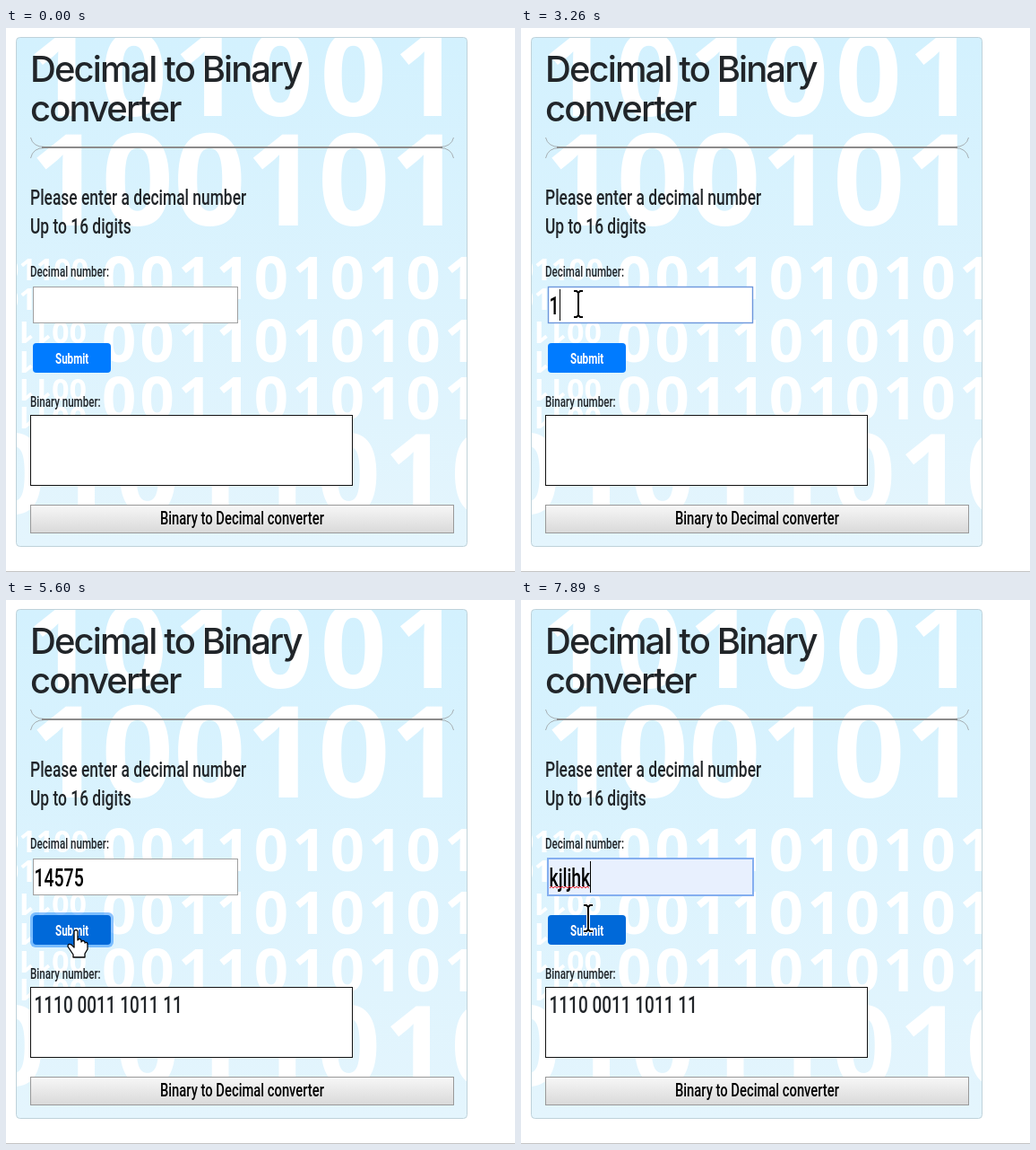
These frames come from a looping animation (568x606 px, 8 s). An HTML page:

```html
<!DOCTYPE html>
<html lang="en">
<head>
<meta charset="utf-8">
<title>Decimal to Binary converter</title>
<style>
  html, body { margin: 0; height: 100%; overflow: hidden; background: #fff; }
  svg { display: block; width: 100vw; height: 100vh; }
  text { white-space: pre; }
  .cond { font-family: Roboto, "Liberation Sans", sans-serif; font-weight: 500; fill: #212529; }
  .title { font: 500 40px Inter, Roboto, sans-serif; letter-spacing: -1.9px; fill: #212529; }
  .digits { font-family: "Open Sans", "Noto Sans", sans-serif; font-weight: 700; fill: #fff; }
  .ui { font: 12.4px "Open Sans", "Noto Sans", sans-serif; fill: #222; }
</style>
</head>
<body>
<svg viewBox="0 0 568 606">
  <defs>
    <linearGradient id="sky" x2="0" y2="1">
      <stop stop-color="#d3f1fe"/><stop offset="1" stop-color="#e4f5fd"/>
    </linearGradient>
    <linearGradient id="steel" x2="0" y2="1">
      <stop stop-color="#f7f7f7"/><stop offset="1" stop-color="#d9d9d9"/>
    </linearGradient>
    <clipPath id="card"><rect x="12" y="11" width="503" height="566" rx="3"/></clipPath>
    <filter id="soft" x="-5%" y="-5%" width="110%" height="112%">
      <feDropShadow dx="0" dy="1" stdDeviation="1.3" flood-opacity=".4"/>
    </filter>
  </defs>

  <rect x="11.5" y="10.5" width="503" height="567" rx="4" fill="url(#sky)"/>
  <g id="digits" class="digits" clip-path="url(#card)"></g>
  <rect x="11.5" y="10.5" width="503" height="567" rx="4" fill="none" stroke="#bfd2da"/>
  <path d="M0 605.5H568" stroke="#c4c4c4"/>

  <text class="title" x="27" y="60">Decimal to Binary</text>
  <text class="title" x="27" y="104">converter</text>
  <path d="M27.5 122Q30 132.5 43 132.5M484 132.5Q497 132.5 499.5 122M27.5 145Q30 133.5 43 133.5M484 133.5Q497 133.5 499.5 145"
        fill="none" stroke="#8c8b8b" opacity=".65"/>
  <path d="M40 133H487" stroke="#8c8b8b" stroke-width="2"/>

  <rect id="input"/>
  <rect id="ring" x="27" y="348" width="93" height="39" rx="6" fill="#007bff" opacity=".45"/>
  <rect id="submit" x="30" y="351" width="87" height="33" rx="4"/>
  <rect x="27.5" y="431.5" width="359" height="78" fill="#fff" stroke="#111"/>
  <rect x="27.5" y="531.5" width="472" height="31" fill="url(#steel)" stroke="#999"/>
  <g id="labels"></g>
  <path id="squiggle" fill="none" stroke="#e23" stroke-width="1"/>
  <rect id="caret" y="291" width="1" height="35"/>

  <g id="list" class="ui">
    <path d="M30 330H259V452Q259 455 256 455H33Q30 455 30 452Z" fill="#fff" filter="url(#soft)"/>
    <rect id="hover" x="30" y="340" width="229" height="36" fill="#e8e8e8"/>
    <text x="42" y="362">kjljhk</text>
    <text x="42" y="398">22</text>
    <text x="42" y="434">255</text>
  </g>
  <g id="tip">
    <rect x="110" y="333" width="134" height="20" fill="#000" opacity=".35"/>
    <rect x="107.5" y="330.5" width="133" height="19" fill="#fff" stroke="#767676"/>
    <text class="ui" x="113" y="344" style="font-size:11.4px;fill:#575757">Please fill out this field.</text>
  </g>

  <g id="cursor" stroke-linejoin="round">
    <g id="beam" fill="none">
      <path d="M-5-14H-2L0-12L2-14H5M0-12V13M-5 15H-2L0 13L2 15H5" stroke="#fff" stroke-width="4"/>
      <path d="M-5-14H-2L0-12L2-14H5M0-12V13M-5 15H-2L0 13L2 15H5" stroke="#000" stroke-width="2"/>
    </g>
    <path id="hand" fill="#fff" stroke="#000" stroke-width="1.3"
      d="M-2 1Q0-2 2 1V11Q4 8 6 11V13Q8 10 10 13V14Q13 12 13 16V21L10 26V30H-3V27L-9 18Q-9 14-5 16L-2 19Z"/>
    <path id="arrow" fill="#fff" stroke="#000" stroke-width="1.3" d="M0 0V25L6 20L10 29L14 27L10 18H18Z"/>
  </g>
</svg>

<script>
const $ = id => document.getElementById(id);
const NARROW = .725;   // the condensed face, shared by all body text
const LOOP = 8000;

function put(parent, str, transform, size, more = {}) {
  const el = document.createElementNS('http://www.w3.org/2000/svg', 'text');
  el.setAttribute('transform', transform);
  el.style.fontSize = size + 'px';
  Object.assign(el.style, more);
  el.textContent = str;
  $(parent).append(el);
  return el;
}

const label = (x, y, size, str, more) => {
  const el = put('labels', str, `translate(${x} ${y}) scale(${NARROW} 1)`, size, more);
  el.setAttribute('class', 'cond');
  return el;
};

const row = (x, y, size, str, gap = 0, turn = 0) =>
  put('digits', str, `translate(${x} ${y}) rotate(${turn})`, size, { letterSpacing: gap + 'px' });

row(-58, 98, 130, '0101001', 7.5);
row(26, 220, 141, '1001011');
for (const y of [302, 372, 436]) row(107, y, 67, '0011010101', 4.2);
for (const y of [281, 314]) row(-5, y, 34, '01100');
for (const y of [327, 360, 391, 422]) row(90, y, 34, '00110', 0, 180);
row(-27, 541, 124, '01011010', 4);

label(27, 197, 24, 'Please enter a decimal number');
label(27, 229, 24, 'Up to 16 digits');
label(27, 277, 16, 'Decimal number:');
label(27, 422, 16, 'Binary number:');
label(55, 374, 16, 'Submit', { fill: '#fff', fontWeight: 600 });
label(172, 553, 20.4, 'Binary to Decimal converter', { fill: '#000' });
const value = label(31.5, 319, 26.8, '', { fill: '#000' });
const result = label(31.5, 460, 26.2, '');

const show = (id, on) => { $(id).style.display = on ? '' : 'none'; };
const within = (t, ...spans) => spans.some(([a, b]) => t >= a && t < b);
const clamp = v => Math.max(0, Math.min(1, v));
const ramp = (t, a, b) => clamp((t - a) / (b - a));
const attr = (id, set) => { for (const k in set) $(id).setAttribute(k, set[k]); };

// pointer stops: time, x, y
const stops = [
  [70, 184, 512], [300, 118, 440], [530, 38, 352], [760, 64, 307],
  [4520, 64, 307], [4760, 186, 338], [5230, 78, 368],
  [5930, 78, 368], [6300, 107, 309],
  [7260, 107, 309], [7340, 96, 320], [7600, 75, 354]
];

function pointer(t) {
  const i = stops.findLastIndex(s => s[0] <= t);
  if (i < 0) return null;
  const [t0, x0, y0] = stops[i], [t1, x1, y1] = stops[i + 1] || [LOOP, x0, y0];
  const k = Math.min(1, Math.floor((t - t0) / 77) * 77 / (t1 - t0));
  return [x0 + (x1 - x0) * k, y0 + (y1 - y0) * k];
}

const inside = (p, x, y, w, h) => p && p[0] >= x && p[0] <= x + w && p[1] >= y && p[1] <= y + h;

function typed(t) {
  if (t >= 7760) return 'kjljhk';
  if (t >= 6370) return '';
  const keys = [3190, 3430, 3600, 3830, 3960];
  return '14575'.slice(0, keys.filter(k => t >= k).length);
}

function draw(t) {
  const focus = within(t, [930, 5360], [6370, LOOP]);
  const filled = t >= 7760;
  const p = pointer(t);
  const onSubmit = inside(p, 30, 351, 87, 33);

  const edge = filled ? 30 : 30.5;
  attr('input', {
    x: edge, y: edge + 258, width: 289 - 2 * edge, height: filled ? 41 : 40,
    fill: filled ? '#e8f0fe' : '#fff',
    stroke: filled ? '#84aef0' : focus ? '#6c96dc' : '#a0a0a0',
    'stroke-width': filled ? 2 : focus ? 1.4 : 1
  });
  value.textContent = typed(t);
  result.textContent = t >= 5500 ? '1110 0011 1011 11' : '';
  const end = Math.round(31.5 + value.getComputedTextLength() * NARROW);
  attr('caret', { x: Math.max(32, end) });
  show('caret', within(t, [930, 1640], [2170, 2630], [3190, 4520], [5050, 5360], [6370, 6940], [7480, LOOP]));

  let wave = 'M32 321';
  for (let x = 34, up = 1; x <= end; x += 2, up ^= 1) wave += `L${x} ${up ? 319 : 321}`;
  attr('squiggle', { d: wave });
  show('squiggle', filled);

  attr('submit', { fill: onSubmit ? '#0069d9' : '#007bff' });
  show('ring', within(t, [5360, 6370]));

  const open = t < 5000
    ? ramp(t, 930, 1240) - ramp(t, 3190, 3260)
    : ramp(t, 6370, 6580) - ramp(t, 7700, 7800);
  attr('list', { opacity: open });
  show('list', open > 0);
  show('hover', t > 7500);
  attr('tip', { opacity: ramp(t, 7110, 7220) - ramp(t, 7400, 7480) });

  show('cursor', p);
  if (!p) return;
  attr('cursor', { transform: `translate(${Math.round(p[0])} ${Math.round(p[1])})` });
  const beam = t > 6370 || inside(p, 30, 288, 229, 41) || inside(p, 27, 431, 360, 79);
  show('beam', beam);
  show('hand', !beam && onSubmit);
  show('arrow', !beam && !onSubmit);
}

const start = performance.now();
function tick() {
  draw((performance.now() - start) % LOOP);
  requestAnimationFrame(tick);
}
tick();
</script>
</body>
</html>
```
